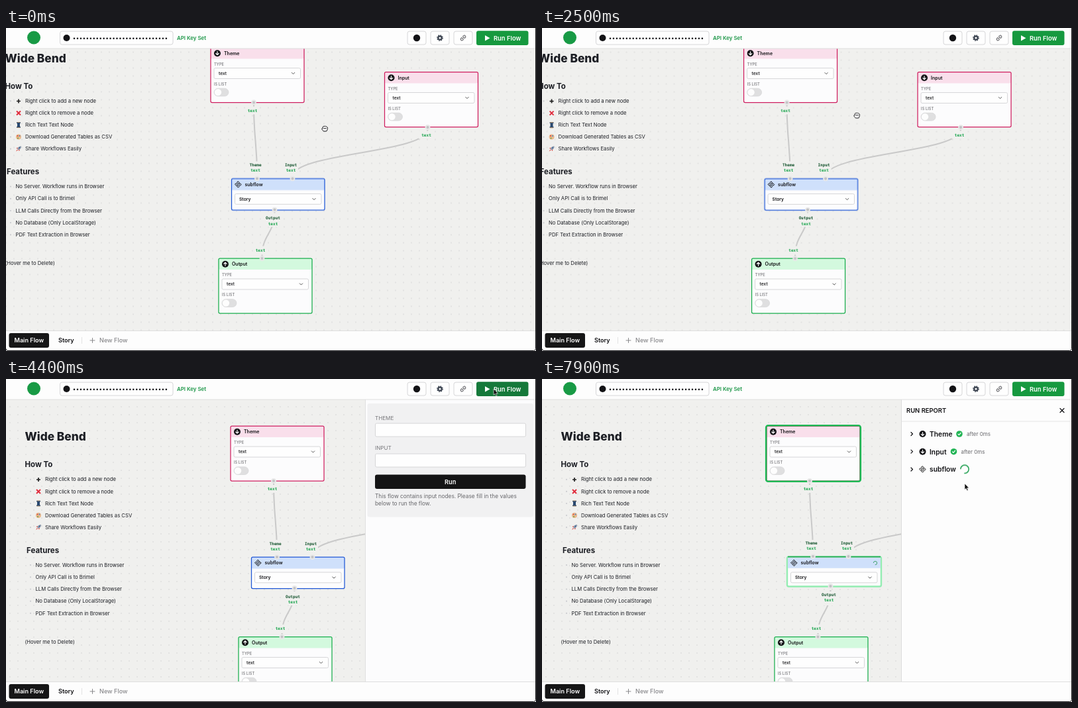
Animation, 800 px wide and 488 px high, one loop 8 s. Source, as an HTML page:

```html
<!DOCTYPE html>
<html lang="en">
<head>
<meta charset="utf-8">
<title>Flow editor</title>
<style>
html, body { margin: 0; width: 100%; height: 100%; overflow: hidden; background: #f0f0ee; }
svg { display: block; font-family: Inter, "Open Sans", sans-serif; fill: #131316; }
.line { fill: none; stroke: #131316; stroke-linecap: round; stroke-linejoin: round; }
.box { fill: #fefefe; stroke: #d6d6d8; }
.gray { fill: #77777b; }
.b6 { font-weight: 600; }
.b5 { font-weight: 500; }
.prose { font-size: 7.7px; fill: #1c1e24; }
.name { font-size: 7px; font-weight: 600; }
.value { font-size: 6.7px; font-weight: 500; }
.value.b6 { font-weight: 600; }
.tiny { font-size: 5.8px; font-weight: 500; fill: #77777b; }
.mono { font: bold 6.05px "DejaVu Sans Mono", monospace; text-anchor: middle; fill: #16a34a; }
.mono .dark { fill: #14532d; }
.edge { fill: none; stroke: #c9c9c9; stroke-width: 2; }
.patch { fill: #f0f0ee; }
.port { fill: #c2c2c4; stroke: #e9e9e9; stroke-width: 1.8; }
.pink { --edge: #cf1f60; --head: #f9dfeb; }
.green { --edge: #18ad4c; --head: #d3f9de; }

/* everything shares one 8 s clock */
.s { animation: 8s step-end infinite; }
.pan { animation: pan 8s linear infinite; }
.move { animation: move 8s ease-in-out infinite; }
.spin { animation: spin 1s linear infinite; }

@keyframes pan {
  0% { transform: translate(-30px, -41.5px); }
  3.75%, 31.25% { transform: translate(-34.5px, -41.5px); }
  37.5% { transform: translate(1.5px, -.5px); }
  40%, 100% { transform: none; }
}
@keyframes move {
  0% { transform: translate(481px, 152px); }
  3.75%, 5% { transform: translate(476.5px, 152px); }
  10%, 23.75% { transform: translate(493px, 176px); }
  29.5%, 31.25% { transform: translate(475px, 132px); animation-timing-function: linear; }
  37.5% { transform: translate(510px, 173px); }
  40%, 42.5% { transform: translate(508.5px, 173.5px); }
  50%, 58% { transform: translate(736px, 15px); }
  64%, 67% { transform: translate(640px, 77px); }
  70%, 73% { transform: translate(640px, 108px); }
  76%, 81% { transform: translate(639px, 121px); }
  85%, 88% { transform: translate(639px, 153px); }
  91%, 100% { transform: translate(638px, 158px); }
}
@keyframes spin { to { transform: rotate(360deg); } }
@keyframes hand { 0% { opacity: 1; } 5% { opacity: 0; } 29% { opacity: 1; } 41.25%, 100% { opacity: 0; } }
@keyframes arrow { 0% { opacity: 0; } 5% { opacity: 1; } 29% { opacity: 0; } 41.25%, 100% { opacity: 1; } }
@keyframes menu { 0% { opacity: 0; } 12.5% { opacity: 1; } 23.75%, 100% { opacity: 0; } }
@keyframes hover { 0% { fill: #16993f; } 49% { fill: #15793a; } 59%, 100% { fill: #16993f; } }
@keyframes form { 0% { opacity: 0; } 52.5% { opacity: 1; } 92.5%, 100% { opacity: 0; } }
@keyframes focus1 { 0% { opacity: 0; } 65% { opacity: 1; } 76.25%, 100% { opacity: 0; } }
@keyframes caret1 { 0% { opacity: 0; } 65% { opacity: 1; } 71.25%, 100% { opacity: 0; } }
@keyframes pop1 { 0% { opacity: 0; } 66.25% { opacity: 1; } 71.25%, 100% { opacity: 0; } }
@keyframes fill1 { 0% { opacity: 0; } 71.25%, 100% { opacity: 1; } }
@keyframes focus2 { 0% { opacity: 0; } 77.5% { opacity: 1; } 91.25%, 100% { opacity: 0; } }
@keyframes caret2 { 0% { opacity: 0; } 77.5% { opacity: 1; } 86.25%, 100% { opacity: 0; } }
@keyframes pop2 { 0% { opacity: 0; } 78.75% { opacity: 1; } 86.25%, 100% { opacity: 0; } }
@keyframes fill2 { 0% { opacity: 0; } 86.25%, 100% { opacity: 1; } }
@keyframes idle { 0% { opacity: 1; } 92.5%, 100% { opacity: 0; } }
@keyframes report { 0% { opacity: 0; } 92.5%, 100% { opacity: 1; } }
@keyframes lift1 { 0% { transform: none; } 92.5%, 100% { transform: translateY(-1px); } }
@keyframes lift3 { 0% { transform: none; } 92.5%, 100% { transform: translateY(-3px); } }
</style>
</head>
<body>
<svg width="800" height="488" viewBox="0 0 800 488">
  <defs>
    <pattern id="dots" width="12" height="12" patternUnits="userSpaceOnUse">
      <circle cx="6" cy="6" r=".65" fill="#cbcbca"/>
    </pattern>
    <g id="down">
      <circle r="5"/>
      <path class="line" d="M0-2.5V2.4M-2.2.3 0 2.5 2.2.3" style="stroke:#fff" stroke-width="1.2"/>
    </g>
    <use id="up" href="#down" transform="rotate(180)"/>
    <path id="flow" class="line" style="stroke:#000" d="M0-4.6l1.7 1.7-1.7 1.7-1.7-1.7zM0 1.2l1.7 1.7L0 4.6l-1.7-1.7zM-2.9-1.7l1.7 1.7-1.7 1.7L-4.6 0zM2.9-1.7 4.6 0 2.9 1.7 1.2 0z"/>
    <path id="chev" class="line" d="M-2.2-1.1 0 1.1 2.2-1.1" style="stroke:#555"/>
    <circle id="port" class="port" r="3"/>
    <circle id="bullet" r="1.1" fill="#cbccd0"/>
    <g id="check">
      <circle r="4.8" fill="#22b455"/>
      <path class="line" d="M-2 .1-.6 1.6 2.1-1.5" style="stroke:#fff" stroke-width="1.2"/>
    </g>
    <g id="card">
      <rect width="141" height="83" rx="2" fill="#fcfcfd"/>
      <rect width="141" height="17" rx="2" style="fill:var(--head)"/>
      <rect width="141" height="83" rx="2" fill="none" stroke-width="1.25" style="stroke:var(--edge)"/>
      <text class="tiny" x="5" y="27.3">TYPE</text>
      <rect class="box" x="5" y="31" width="130.5" height="16" rx="2"/>
      <text class="value" x="12" y="41.4">text</text>
      <use href="#chev" x="124.5" y="39"/>
      <text class="tiny" x="5" y="57.3">IS LIST</text>
      <rect x="5" y="61.7" width="22" height="11.8" rx="5.9" fill="#dfdfe0" stroke="#d2d2d4" stroke-width=".6"/>
      <circle cx="11" cy="67.6" r="5.2" fill="#fdfdfd"/>
    </g>
    <path id="tip" d="M623 144q0-4 4-4h4l6-5.5 6 5.5h81q4 0 4 4v21q0 4-4 4h-97q-4 0-4-4z" fill="#1c1c1e"/>
  </defs>

  <rect width="800" height="488" fill="#f0f0ee"/>

  <g class="pan">
    <rect x="-60" y="-60" width="960" height="660" fill="url(#dots)"/>

    <g class="prose">
      <text x="28.5" y="93" font-size="17.3" font-weight="800">Wide Bend</text>
      <text x="28.5" y="133.3" font-size="11.5" font-weight="700">How To</text>
      <g id="howto"></g>
      <path d="M46 152h6M49 149v6" stroke="#222" stroke-width="1.7"/>
      <path d="M46 167l6 6m0-6-6 6" stroke="#e02b3c" stroke-width="1.9"/>
      <path d="M46 184h6v1.5h-1v5h1v1.5h-6v-1.5h1v-5h-1z" fill="#29486f"/>
      <path d="M46.5 184h5M46.5 192h5" stroke="#a58a6b" stroke-width="1.2"/>
      <circle cx="49" cy="206" r="4" fill="#e9b98e"/>
      <circle cx="47.5" cy="204.5" r="1" fill="#d94235"/>
      <circle cx="50.5" cy="204.5" r="1" fill="#3f83c5"/>
      <circle cx="48" cy="208" r="1" fill="#6a9f45"/>
      <path d="M53 220q-4 0-6 4l2 2q4-2 4-6z" fill="#8c99ab"/>
      <path d="M48 222l-2.5 1 1.5 1zM51 225l-1 2.5-1-1.5zM47 225l-2 3 3-2z" fill="#d8382f"/>
      <circle cx="50.5" cy="222.5" r=".9" fill="#285a94"/>
      <text x="31" y="262.7" font-size="11.5" font-weight="700">Features</text>
      <g id="features"></g>
      <text x="28.5" y="399.7">(Hover me to Delete)</text>
    </g>

    <path class="edge" d="M404 157C404 211.500 409 211.500 409 266"/>
    <path class="edge" d="M666.5 194.500C666.5 230.250 462.5 230.250 462.5 266"/>
    <path class="edge" d="M435.5 319C435.5 352.750 416.5 352.750 416.5 386.500"/>
    <path class="patch" d="M391 160h22v12h-22zM653 197h22v12h-22zM395 243h23v25h-23zM449 243h22v25h-22zM420 321h26v21h-26zM403 371h23v13h-23z"/>

    <g class="pink">
      <use href="#card" x="339" y="71"/>
      <use href="#card" x="601.5" y="108"/>
    </g>
    <use class="green" href="#card" x="351" y="389.5"/>
    <rect class="s" style="animation-name:report" x="338.2" y="70.2" width="142.6" height="84.6" rx="3" fill="none" stroke="#1fbb57" stroke-width="2.6"/>
    <use href="#down" x="349" y="79.7"/>
    <use href="#down" x="611.5" y="116.7"/>
    <use href="#up" x="361" y="398.2"/>
    <g class="name">
      <text x="359" y="82.3">Theme</text>
      <text x="621.5" y="119.3">Input</text>
      <text x="371" y="400.8">Output</text>
    </g>

    <g class="s" style="animation-name:idle">
      <rect x="370.5" y="269" width="140.5" height="47.5" rx="2" fill="#fcfcfd"/>
      <rect x="370.5" y="269" width="140.5" height="17.5" rx="2" fill="#cfe0fb"/>
      <rect x="370.5" y="269" width="140.5" height="47.5" rx="2" fill="none" stroke="#1f57d6" stroke-width="1.25"/>
    </g>
    <g class="s" style="animation-name:report">
      <rect x="370" y="268.5" width="142" height="45" rx="2.5" fill="#fcfcfd" stroke="#94edb2" stroke-width="2.4"/>
      <path d="M371 269.7h140v16h-140z" fill="#cfe0fb"/>
      <path d="M371 268.6h140" stroke="#27a854" stroke-width="1.8"/>
      <g transform="translate(503 278) rotate(-144)">
        <circle class="spin" r="2.7" fill="none" stroke="#4aa577" stroke-dasharray="12.7 20"/>
      </g>
    </g>
    <use href="#flow" x="380.5" y="278"/>
    <text class="name" x="390.5" y="280.3">subflow</text>
    <rect class="box" x="375.5" y="292" width="130.5" height="15.8" rx="2"/>
    <text class="value b6" x="382" y="302.3">Story</text>
    <use href="#chev" x="495" y="300"/>

    <use href="#port" x="404" y="154"/>
    <use href="#port" x="666.5" y="191.5"/>
    <use href="#port" x="416.5" y="389.5"/>
    <g class="mono">
      <text x="402" y="168">text</text>
      <text x="664.5" y="205.5">text</text>
      <text x="414" y="379">text</text>
      <g class="s" style="animation-name:lift1">
        <use href="#port" x="409" y="269"/>
        <use href="#port" x="462.5" y="269"/>
        <text class="dark" x="406.5" y="250.8">Theme</text>
        <text x="406.5" y="258.8">text</text>
        <text class="dark" x="460" y="250.8">Input</text>
        <text x="460" y="258.8">text</text>
      </g>
      <g class="s" style="animation-name:lift3">
        <use href="#port" x="435.5" y="316"/>
        <text class="dark" x="433" y="330.8">Output</text>
        <text x="433" y="339">text</text>
      </g>
    </g>
  </g>

  <g class="s" style="animation-name:form">
    <rect x="542.5" y="30" width="260" height="430" fill="#fcfcfd" stroke="#e0e0e0"/>
    <rect x="545.5" y="37" width="250.5" height="171.5" rx="3" fill="#f1f1f2"/>
    <g class="gray" font-size="8.1">
      <text x="557" y="61.5">THEME</text>
      <text x="557" y="107.2">INPUT</text>
    </g>
    <rect class="box" x="557.5" y="67" width="227" height="20" rx="2"/>
    <rect class="box" x="557.5" y="113" width="227" height="20" rx="2"/>
    <g class="s" style="animation-name:fill1">
      <rect x="557.5" y="67" width="227" height="20" rx="2" fill="#e1eafb" stroke="#c9ced9"/>
      <text x="564" y="80.4" font-size="9.1">Walter bennick</text>
    </g>
    <g class="s" style="animation-name:fill2">
      <rect x="557.5" y="113" width="227" height="20" rx="2" fill="#e1eafb" stroke="#c9ced9"/>
      <text x="564" y="126.4" font-size="9.1">duck</text>
    </g>
    <rect class="s line" style="animation-name:focus1" x="557.5" y="67" width="227" height="20" rx="2" stroke-width="1.6"/>
    <rect class="s line" style="animation-name:focus2" x="557.5" y="113" width="227" height="20" rx="2" stroke-width="1.6"/>
    <path class="s line" style="animation-name:caret1" d="M564.5 72v10"/>
    <path class="s line" style="animation-name:caret2" d="M564.5 118v10"/>
    <rect x="557" y="144.5" width="227.5" height="21.5" rx="3" fill="#141415"/>
    <text class="b6" x="670.7" y="158.6" font-size="9.2" text-anchor="middle" fill="#fff">Run</text>
    <g font-size="8.3" fill="#66666a">
      <text x="557" y="179.8">This flow contains input nodes. Please fill in the values</text>
      <text x="557" y="190.6">below to run the flow.</text>
    </g>
    <g class="s" style="animation-name:pop1">
      <use href="#tip" y="-46"/>
      <text x="631.5" y="111.7" font-size="9.1" fill="#eee">Walter bennick</text>
    </g>
    <g class="s" style="animation-name:pop2">
      <use href="#tip"/>
      <text x="631.5" y="157.7" font-size="9.1" fill="#eee">duck</text>
    </g>
  </g>

  <g class="s" style="animation-name:report">
    <rect x="542.5" y="30" width="260" height="430" fill="#fdfdfd" stroke="#dcdcdc"/>
    <path d="M543 64h257" stroke="#e4e4e4"/>
    <text class="b6" x="550" y="50.8" font-size="9.45">RUN REPORT</text>
    <path class="line" d="M782 44.5l6 6m0-6-6 6" stroke-width="1.2"/>
    <path class="line" d="M557 80.5l2.5 2.5-2.5 2.5M557 107.2l2.5 2.5-2.5 2.5M557 134l2.5 2.5-2.5 2.5" stroke-width="1.2"/>
    <use href="#down" x="574.5" y="83"/>
    <use href="#down" x="574.5" y="109.7"/>
    <use href="#flow" x="574.5" y="136.5"/>
    <g class="b6" font-size="10.3">
      <text x="585" y="86.7">Theme</text>
      <text x="585" y="113.5">Input</text>
      <text x="585" y="140.2">subflow</text>
    </g>
    <use href="#check" x="630" y="83"/>
    <use href="#check" x="621.5" y="109.7"/>
    <g font-size="8" fill="#66666a">
      <text x="641" y="85.8">after 0ms</text>
      <text x="632.5" y="112.5">after 0ms</text>
    </g>
    <g transform="translate(638 136.3) rotate(-144)">
      <circle class="spin" r="6.2" fill="none" stroke="#1c9d4d" stroke-width="1.5" stroke-dasharray="29.2 50"/>
    </g>
  </g>

  <path d="M0 0h800v31H0zM0 457.5h800V488H0z" fill="#fdfdfd"/>
  <path d="M0 31h800M0 457.5h800" stroke="#dedede"/>
  <circle cx="42" cy="14.5" r="10" fill="#189a45"/>
  <rect class="box" x="81.5" y="5" width="170.5" height="20" rx="3"/>
  <circle cx="91.5" cy="15" r="5"/>
  <path class="line" d="M103 15.8h142" stroke-width="2.6" stroke-dasharray="0 4.96"/>
  <text class="b6" x="258" y="17.9" font-size="7.9" fill="#1c9647">API Key Set</text>
  <rect class="box" x="606" y="5" width="28" height="20" rx="3"/>
  <rect class="box" x="641" y="5" width="28" height="20" rx="3"/>
  <rect class="box" x="676" y="5" width="28" height="20" rx="3"/>
  <circle cx="620" cy="15" r="5.2"/>
  <g fill="none" stroke="#3b4350">
    <circle cx="655" cy="15" r="2.7" stroke-width="2.2"/>
    <circle cx="655" cy="15" r="4.2" stroke-width="1.3" stroke-dasharray="1.65 1.65"/>
  </g>
  <g class="line" style="stroke:#55555a" transform="translate(690 15) rotate(-45)">
    <path d="M-1-1.9h-1.7a1.9 1.9 0 0 0 0 3.8H-1M1-1.9h1.7a1.9 1.9 0 0 1 0 3.8H1M-2 0h4"/>
  </g>
  <rect class="s" style="animation-name:hover" x="710" y="4.2" width="78.5" height="21.8" rx="3" fill="#16993f"/>
  <path d="M723 11l7.5 4.2-7.5 4.2z" fill="#fff"/>
  <text class="b6" x="736" y="18.5" font-size="9.4" fill="#fff">Run Flow</text>

  <rect x="4.5" y="461" width="60.5" height="22" rx="3" fill="#161617"/>
  <g class="b6" font-size="9.1">
    <text x="12.5" y="475.4" fill="#fff">Main Flow</text>
    <text x="79" y="475.4">Story</text>
    <text class="b5" x="141" y="475.4" fill="#88888b">New Flow</text>
  </g>
  <path d="M114.5 467v10" stroke="#e3e3e3"/>
  <path class="line" d="M127 472h7M130.5 468.5v7" style="stroke:#88888b"/>
  <path d="M0 484.5q0 3 3 3h793.5q3 0 3-3V0" fill="none" stroke="#161618"/>

  <g class="s" style="animation-name:menu">
    <rect x="494" y="175" width="88" height="156.5" rx="3" fill="#fefefe" stroke="#18181b" stroke-width="1.5"/>
    <text class="b5" x="502.5" y="192.5" font-size="9.5">Aa</text>
    <path class="line" d="M512.5 209.5l-4 4.5a2.8 2.8 0 0 1-4.2-3.8l4.2-4.6a1.9 1.9 0 0 1 2.9 2.5l-4 4.5a.9.9 0 0 1-1.4-1.2l3.5-3.9"/>
    <circle cx="508.5" cy="231.8" r="5"/>
    <path class="line" d="M504 248.8h9.5v9H504zM504 251.8h9.5M507.3 248.8v9M504 254.8h9.5"/>
    <use href="#flow" x="508.5" y="274.5"/>
    <use href="#down" x="508.5" y="296"/>
    <use href="#up" x="508.5" y="317.5"/>
    <g id="items" class="b5" font-size="9.1"></g>
  </g>

  <g class="move">
    <path class="s" style="animation-name:arrow" d="M0 0v9.2l2.1-1.9 1.5 3.4 1.6-.7-1.5-3.3h2.9z" fill="#111" stroke="#fff" stroke-width=".6"/>
    <g class="s line" style="animation-name:hand">
      <path fill="#fff" d="M-2.8-2.6q.6-1.5 2-.8 1.200-.8 2.200.1 1.600-.4 1.900.8 1.200.2 1.100 1.700 0 2.500-1.700 4.800h-4.400q-1.200-1.600-2.300-2.800-.8-1.600.8-1.900z"/>
      <path d="M-1.500-.4h3.800" stroke-width=".9"/>
    </g>
  </g>
</svg>
<script>
const SVG = "http://www.w3.org/2000/svg";

function add(parent, tag, attrs, text = "") {
  const el = document.createElementNS(SVG, tag);
  for (const key in attrs) el.setAttribute(key, attrs[key]);
  el.textContent = text;
  parent.append(el);
}

function list(id, x, y, step, lines, bullets) {
  const parent = document.getElementById(id);
  lines.forEach((line, i) => {
    const base = y + i * step;
    if (bullets) add(parent, "use", { href: "#bullet", x: 37, y: base - 2.6 });
    add(parent, "text", { x, y: base }, line);
  });
}

list("howto", 59, 154.4, 18.1, [
  "Right click to add a new node",
  "Right click to remove a node",
  "Rich Text Text Node",
  "Download Generated Tables as CSV",
  "Share Workflows Easily"
], true);

list("features", 44.5, 283.7, 18.2, [
  "No Server. Workflow runs in Browser",
  "Only API Call is to Brimel",
  "LLM Calls Directly from the Browser",
  "No Database (Only LocalStorage)",
  "PDF Text Extraction in Browser"
], true);

list("items", 520, 192.3, 21.45, [
  "Text", "Attachment", "LLM", "Extract Data", "Subflow", "Input", "Output"
]);
</script>
</body>
</html>
```
